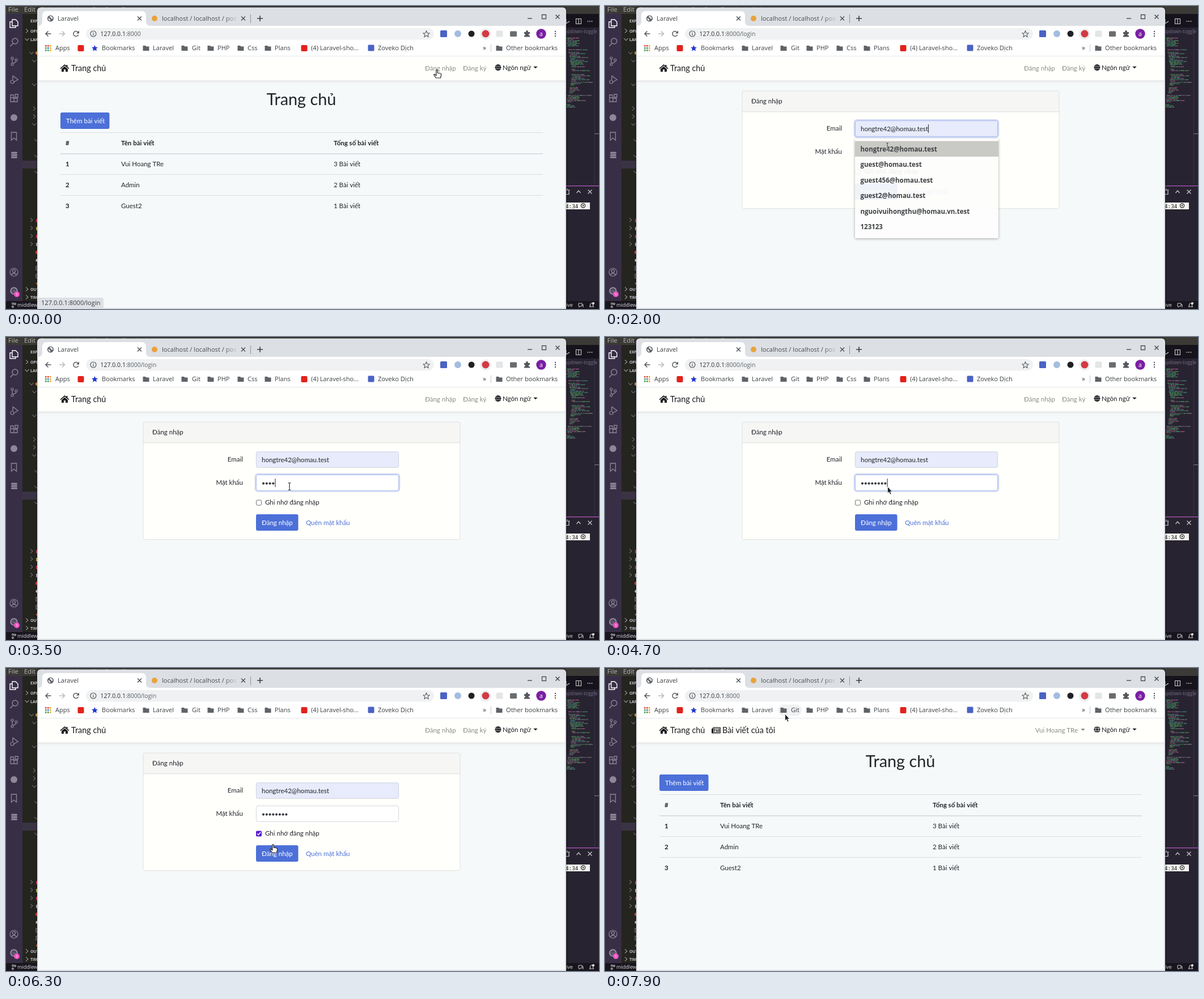
An HTML page with a canvas for the animation above (8 s loop, 1046x535 px).

```html
<!DOCTYPE html>
<html lang="vi">
<head>
<meta charset="utf-8">
<title>Trang chủ</title>
<style>
html, body { margin: 0; width: 100%; height: 100%; overflow: hidden; background: #282330; }
canvas { display: block; width: 1046px; height: 535px; }
</style>
</head>
<body>
<canvas id="stage" width="1046" height="535"></canvas>
<script>
const c = document.getElementById('stage').getContext('2d');
const UI = '"Open Sans", "Noto Sans", sans-serif';
const WEB = 'Lato, "Open Sans", sans-serif';
const MONO = '"DejaVu Sans Mono", monospace';
const LOOP = 8000, STEP = 100;
const EMAIL = 'hongtre42@homau.test', USER = 'Vui Hoang TRe', HOST = '127.0.0.1:8000';

function rect(x, y, w, h, fill, r = 0) {
  c.fillStyle = fill;
  c.beginPath();
  c.roundRect(x, y, w, h, r);
  c.fill();
}
function box(x, y, w, h, stroke, r = 0, lw = 1) {
  c.strokeStyle = stroke;
  c.lineWidth = lw;
  c.beginPath();
  c.roundRect(x, y, w, h, r);
  c.stroke();
}
function dot(x, y, r, fill) {
  c.fillStyle = fill;
  c.beginPath();
  c.arc(x, y, r, 0, 7);
  c.fill();
}
function ring(x, y, r, stroke, lw = 1.2, from = 0, to = 7) {
  c.strokeStyle = stroke;
  c.lineWidth = lw;
  c.beginPath();
  c.arc(x, y, r, from, to);
  c.stroke();
}
function path(d, x, y, { fill, stroke, lw = 1.3 }) {
  const p = new Path2D(d);
  c.save();
  c.translate(x, y);
  if (fill) { c.fillStyle = fill; c.fill(p); }
  if (stroke) { c.strokeStyle = stroke; c.lineWidth = lw; c.stroke(p); }
  c.restore();
}
const line = (d, x, y, stroke, lw) => path(d, x, y, { stroke, lw });
const shape = (d, x, y, fill) => path(d, x, y, { fill });
function text(s, x, y, { size = 11.1, font = UI, color = '#3c4043', weight = 400, align = 'left' } = {}) {
  c.font = `${weight} ${size}px ${font}`;
  c.fillStyle = color;
  c.textAlign = align;
  c.fillText(s, x, y);
  return c.measureText(s).width;
}
const web = (s, x, y, o) => text(s, x, y, { size: 11.5, font: WEB, color: '#212529', ...o });

function mulberry(seed) {
  return () => {
    seed = seed + 0x6D2B79F5 | 0;
    let v = Math.imul(seed ^ seed >>> 15, 1 | seed);
    v = v + Math.imul(v ^ v >>> 7, 61 | v) ^ v;
    return ((v ^ v >>> 14) >>> 0) / 4294967296;
  };
}

const CROSS = 'M-3.5-3.5L3.5 3.5M3.5-3.5L-3.5 3.5';
const RIGHT = 'M-2-3.5L2 0L-2 3.5', DOWN = 'M-3.5-2L0 2L3.5-2', UP = 'M-3.5 2L0-2L3.5 2';
const STAR = 'M0-5.5L1.6-1.8L5.5-1.5L2.6 1.1L3.5 5L0 2.9L-3.5 5L-2.6 1.1L-5.5-1.5L-1.6-1.8Z';
const FOLDER = 'M-5.5-4.5H-1L.5-3H5.5V4.5H-5.5Z';

function globe(x, y, r, fill, land) {
  dot(x, y, r, fill);
  line(`M${-r} -1.8H${r}M${-r} 1.8H${r}`, x, y, land, .7);
  c.beginPath();
  c.ellipse(x, y, r * .45, r, 0, 0, 7);
  c.stroke();
}

// ---- editor behind the browser ----
function editor() {
  const grey = '#8d8798', side = '#c9c6d0';
  rect(0, 0, 1046, 535, '#282330');
  rect(0, 0, 1046, 14, '#3b3a36');
  text('File', 4, 10, { size: 11.3, color: '#b9b7b0' });
  text('Edit', 32, 10, { size: 11.3, color: '#b9b7b0' });
  text('Selection   View   Go   Run   Terminal   Help', 61, 10, { size: 11.3, color: '#b9b7b0' });
  rect(0, 14, 29, 507, '#382f47');
  rect(29, 14, 27, 507, '#25251f');
  rect(29, 273, 27, 14, '#3a3344');
  rect(0, 521, 1046, 14, '#18151e');

  line('M-3-7H3L7-3V4H-3ZM-3-3H-7V7H3V4', 14, 31, '#fff', 1.4);
  ring(16, 62, 5, grey, 1.4);
  line('M12.5 66L7.5 71', 0, 0, grey, 1.6);
  ring(11, 92, 2, grey); ring(11, 103, 2, grey); ring(18, 95, 2, grey);
  line('M11 94V101M18 97Q18 100 12 101', 0, 0, grey);
  line('M-2-7L7 0L-1 5M-2-7V0', 14, 130, grey, 1.4);
  ring(11, 134, 3, grey);
  line('M-6-1H0V6H-6ZM0 6H6V0H0M-6-1V-6H-1V-1M2-7H7V-2H2Z', 14, 163, grey);
  dot(14, 197, 6, grey);
  line('M-4.5-7H4.5V7L0 3L-4.5 7Z', 14, 230, grey);
  for (let i = 0; i < 3; i++) rect(9, 257.5 + i * 4, 11, 3.2, grey, 1.5);
  ring(14, 470, 7, grey); ring(14, 468, 2.6, grey);
  line('M9 475Q14 469 19 475', 0, 0, grey);
  ring(14, 503, 5.5, grey, 2.6); ring(14, 503, 2, grey);
  dot(19, 509, 5, '#f255c5');
  text('1', 19, 511.5, { size: 7, color: '#fff', align: 'center' });

  const label = (s, x, y) => text(s, x, y, { size: 7, weight: 700, color: side });
  label('EXPLORER', 43, 29);
  [['OPEN', 44, RIGHT], ['LARAVEL', 59, DOWN], ['OUTLINE', 500, RIGHT], ['TIMELINE', 514, RIGHT]].forEach(([s, y, d]) => {
    line(d, 37, y, side, 1);
    label(s, 43, y + 3);
  });
  for (const y of [83, 97, 139, 209, 237, 265, 293]) line(DOWN, y < 90 ? 45 : y < 220 ? 50 : 54, y, grey, 1);
  for (const y of [181, 195]) line(RIGHT, 50, y, grey, 1);
  ['#d23b4e', '#c9b458', '#d23b4e', '#b3aebc'].forEach((k, i) => {
    line(RIGHT, 45, 378 + i * 14, grey, 1);
    rect(53, 376 + i * 14, 3, 6, k);
  });
  dot(55, 83, 3, '#d9963a');
  dot(55, 435, 3, '#e2493c');
  dot(55, 449, 2.5, '#ddd');
  [466, 480].forEach(y => text('[', 52, y, { size: 9, color: side }));
  dot(55, 490, 2, '#d9703a');
  ring(12, 525.5, 1.5, '#ddd', 1); ring(12, 531, 1.5, '#ddd', 1); ring(16, 526, 1.5, '#ddd', 1);
  text('middleware', 20, 531, { size: 9, color: '#ddd' });

  rect(988, 14, 58, 24, '#16131c');
  line('M-3-4V4M-3 4L3 0', 991, 27, '#ccc', 1.2);
  line('M-4.5-4.5H4.5V4.5H-4.5ZM0-4.5V4.5', 1010, 27, '#ccc', 1.1);
  for (let i = -1; i < 2; i++) dot(1030 + i * 3.5, 27, .9, '#ccc');
  text('dropdown-toggle', 1043, 48, { size: 8.3, color: '#77708a', align: 'right' });
  const rnd = mulberry(11), inks = ['#55d97a', '#6fc06e', '#d868a8', '#9a93a8', '#4fb8a0'];
  for (let i = 0; i < 54; i++) {
    const y = 56 + i * 2.3;
    let x = 988 + (1 - Math.cos(i / 8.5)) * 4.5 + rnd() * 3;
    const end = x + 6 + rnd() * rnd() * 42;
    if (rnd() < .12) continue;
    while (x < end && x < 1037) {
      const w = 2 + rnd() * 7;
      c.globalAlpha = .55 + rnd() * .3;
      rect(x, y, Math.min(w, 1038 - x), 1.2, inks[rnd() * inks.length | 0]);
      x += w + 1;
    }
  }
  c.globalAlpha = 1;
  rect(1038, 38, 1, 279, '#39334a');
  rect(1038, 225, 8, 1.2, '#77718a');
  rect(988, 317, 58, 1.2, '#b455c4');
  line('M-3-3H3V4.5H-3ZM-4.5-3H4.5M-1-5H1', 990, 328, '#ccc', 1.2);
  line(UP, 1010, 328, '#ccc', 1.2);
  line(CROSS, 1030, 328, '#ccc', 1.2);
  rect(988, 347, 42, 12, '#f1f1ee');
  text('4:34', 987, 356.5, { size: 9.3, font: MONO, color: '#222' });
  ring(1018, 352.5, 3.6, '#222', 1.2); dot(1018, 352.5, 1.2, '#222');
  text('ive', 988, 531, { size: 9, color: '#ddd' });
  line('M-4-3H2V2H-1L-3 4V2H-4ZM2-1H4V4', 1014, 528, '#ccc', 1);
  line('M-3.5 3H3.5L2.5 1V-1Q0-6-2.5-1V1Z', 1033, 528, '#ccc', 1.1);
  dot(1036, 525, 2, '#fff');
}

// ---- browser frame ----
function browser(s) {
  c.save();
  c.shadowColor = 'rgba(0,0,0,.5)';
  c.shadowBlur = 4;
  rect(55, 2.5, 933, 534, '#dcdfe3', [6, 6, 0, 0]);
  c.restore();
  rect(57, 35, 929, 498, '#fff');
  shape('M56 35Q64 35 64 28V17Q64 9 72 9H239Q247 9 247 17V28Q247 35 255 35Z', 0, 0, '#fff');
  if (s.loading) ring(78, 22, 5, '#4a80d8', 1.7, s.t / 150, s.t / 150 + 4);
  else {
    dot(78.5, 22, 5.6, '#5f6368');
    shape('M-4-1L-1 1L0 4Q-4 4-4-1ZM-1-4.2Q4-4 4 .5L1 1L2-1.5H-1Z', 78.5, 22, '#fff');
  }
  text('Laravel', 91, 26);
  line(CROSS, 235.5, 22, '#4a4d51', 1.4);
  dot(262, 22, 5, '#e9a23b');
  const fade = c.createLinearGradient(385, 0, 410, 0);
  fade.addColorStop(0, '#4a4d52');
  fade.addColorStop(1, 'rgba(74,77,82,0)');
  text('localhost / localhost / pos', 275, 26, { color: fade });
  line(CROSS, 418.5, 22, '#4a4d51', 1.4);
  rect(431, 15, 1, 15, '#8e9297');
  line('M-5 0H5M0-5V5', 448, 22, '#3c4043', 1.6);
  line('M-4 3H4', 924, 19, '#4a4d51', 1.4);
  box(945.5, 15.5, 7, 7, '#4a4d51', 0, 1.3);
  line(CROSS, 973, 19, '#4a4d51', 1.5);

  const icon = '#54585c';
  line('M5 0H-4.5M0-4.5L-4.5 0L0 4.5', 74.5, 49, icon, 1.5);
  line('M-5 0H4.5M0-4.5L4.5 0L0 4.5', 99, 49, '#b9bbbe', 1.5);
  ring(123.5, 49, 4.5, icon, 1.5, .4, 5.5);
  shape('M5.5-5.5V-.5H.5Z', 123.5, 49, icon);
  rect(141, 39, 614, 20.5, '#eff1f2', 10.3);
  ring(154, 49, 5, icon);
  line('M0-1V3M0-3V-1.8', 154, 49, icon, 1.2);
  const w = text(HOST.slice(0, 9), 166.5, 53, { size: 10.5, color: '#2b2e31' });
  text(HOST.slice(9) + (s.page === 'login' ? '/login' : ''), 166.5 + w, 53, { size: 10.5, color: '#5f6368' });
  line(STAR, 741.5, 49.5, icon, 1.1);
  rect(766, 43, 12, 12, '#4a63c4', 1.5);
  dot(797, 49, 6, '#a3bde0');
  dot(821, 49, 5.5, '#202124');
  dot(846, 49.5, 10, '#eceeef');
  dot(846, 49, 6.5, '#d23a44');
  rect(864.5, 43.5, 12, 11, '#e4e5e6', 1.5);
  rect(889, 44.5, 12, 9.5, '#6a6d70', 1.5);
  shape('M-5-3H-2Q-2-6 0-6Q2-6 2-3H5V0Q2.5 0 2.5 1.7Q2.5 3 5 3V5.5H-5V3Q-3 3-3 1.5Q-3 0-5 0Z', 919, 49, icon);
  dot(944, 49, 8.7, '#7a1fa2');
  text('a', 944, 52.5, { size: 10.5, color: '#fff', align: 'center' });
  for (let i = -1; i < 2; i++) dot(969, 49 + i * 4, 1.2, icon);

  if (s.git) rect(305, 64.5, 42, 20, '#f0f1f2', 10);
  const red = '#e0493c', yellow = '#e8b13a', green = '#46a15a';
  [red, red, yellow, green, '#4a80d8', yellow, green, green, yellow].forEach((k, i) =>
    rect(69 + i % 3 * 4, 69 + (i / 3 | 0) * 4, 2.7, 2.7, k));
  rect(126.5, 69, 11, 11, '#e3211c', 2);
  shape(STAR, 156.5, 74.5, '#2238cf');
  for (const x of [247, 315, 361, 414, 462, 870]) shape(FOLDER, x, 74.5, '#5f6368');
  rect(520.5, 69, 11, 11, '#e3211c', 2);
  rect(638.5, 68.5, 11, 11, '#4a63c4', 1.5);
  [['Apps', 87], ['Bookmarks', 169], ['Laravel', 259], ['Git', 328], ['PHP', 373], ['Css', 426], ['Plans', 474],
    ['(4) Laravel-sho…', 538], ['Zoveko Dịch', 656], ['Other bookmarks', 882]].forEach(([b, x]) => text(b, x, 78));
  text('»', 844, 78, { align: 'center', size: 12 });
  rect(855, 68, 1, 13, '#c5c8cc');
  rect(57, 88, 929, 1, '#e4e6e8');
}

// ---- web page ----
const PAPER = '#fffffc';

function nav(s) {
  rect(57, 89, 929, 444, '#f6f9fa');
  c.save();
  c.beginPath();
  c.rect(57, 89, 929, 60);
  c.clip();
  c.shadowColor = 'rgba(0,0,0,.1)';
  c.shadowBlur = 4;
  c.shadowOffsetY = 1.5;
  rect(50, 80, 950, 51.5, PAPER);
  c.restore();
  rect(57, 88, 929, 1, '#e4e6e8');

  const ink = '#1a1c1e';
  shape('M-8 0L0-7L3-4.4V-6H5V-2.6L8 0L7 1.2L0-4.8L-7 1.2ZM-5.5 1.2L0-3.4L5.5 1.2V6H1.5V2H-1.5V6H-5.5Z', 103.5, 110, ink);
  web('Trang chủ', 115, 115, { size: 14.4, color: ink });
  const soft = 'rgba(0,0,0,.46)';
  if (s.signed) {
    rect(190, 104.5, 14, 11, ink, 1.5);
    rect(188, 106.5, 3, 9, ink, 1.5);
    box(191.5, 106, 11, 8, PAPER, 0, .8);
    rect(193, 107.3, 8, 1.6, PAPER);
    rect(193, 110, 3.4, 2.8, PAPER);
    for (let i = 0; i < 2; i++) rect(197.5, 110 + i * 1.8, 3.5, 1, PAPER);
    web('Bài viết của tôi', 207, 115, { size: 14.4, color: ink });
    web(USER, 834, 113.5, { color: soft, align: 'right' });
    shape('M-3.7-1.8H3.7L0 1.8Z', 843, 109, 'rgba(0,0,0,.5)');
  } else {
    web('Đăng nhập', 739, 114, { color: s.hover ? 'rgba(0,0,0,.7)' : soft });
    web('Đăng ký', 806, 114, { color: soft });
  }
  globe(868, 108.5, 5.5, ink, PAPER);
  web('Ngôn ngữ', 876, 113, { color: ink });
  shape('M-3.7-1.8H3.7L0 1.8Z', 934, 108.5, ink);
}

const BLUE = '#4c70d8';
function button(label, x, y, w) {
  rect(x, y, w, 29, BLUE, 3);
  web(label, x + 10, y + 18.5, { color: '#fff' });
}

function home() {
  web('Trang chủ', 521, 175, { size: 28.8, align: 'center' });
  button('Thêm bài viết', 96, 188, 86.5);
  [[223, 1], [260, 2], [297, 1], [334, 1]].forEach(([y, h]) => rect(96, y, 851, h, '#dbdfe3'));
  [['#', 'Tên bài viết', 'Tổng số bài viết'], ['1', USER, '3 Bài viết'], ['2', 'Admin', '2 Bài viết'], ['3', 'Guest2', '1 Bài viết']]
    .forEach((row, i) => row.forEach((cell, j) =>
      web(cell, [105, 203, 578][j], i ? 246 + i * 37 : 245.5, { weight: i && j ? 400 : 700 })));
}

function field(y, focus, fill = '#fff') {
  if (focus) box(440, y - 1, 254, 30.5, `rgba(78,115,223,${.27 * focus})`, 4.5, 2.6);
  rect(441, y, 252, 28.5, fill, 3);
  box(441.4, y + .4, 251.2, 27.7, focus ? '#a3b4ea' : '#cdd2d8', 3, .9);
}
const caret = (x, y) => rect(x, y, 1, 15, '#222');

function login(s) {
  rect(242, 150, 559, 208, PAPER, 3);
  rect(242, 150, 559, 37, '#f6f6f5', [3, 3, 0, 0]);
  rect(242, 186.3, 559, .9, '#dcdddd');
  box(242, 150, 559, 207.7, '#dcdddd', 3, .9);
  web('Đăng nhập', 258, 172);
  web('Email', 418, 220, { align: 'right' });
  web('Mật khẩu', 418, 261, { align: 'right' });
  field(202.3, s.mailFocus, s.filled ? '#e7ebfb' : '#fff');
  const w = s.filled ? web(EMAIL, 451, 220.8) : 0;
  if (s.mailFocus === 1) caret(451 + w, 209);
  field(243, s.passFocus);
  for (let i = 0; i < s.dots; i++) dot(454 + i * 5.77, 258.6, 2.1, '#3a3e42');
  if (s.passFocus === 1) caret(451 + s.dots * 5.77 + (s.dots ? .4 : 0), 250);
  if (s.checked) {
    rect(441, 287.5, 10, 10, '#5a1fd0', 2);
    line('M-2.8 0L-.8 2.2L3-2.4', 446, 292.5, '#fff', 1.5);
  } else {
    rect(441, 287.5, 10, 10, '#fff', 2);
    box(441.5, 288, 9, 9, '#6f7276', 2, 1);
  }
  web('Ghi nhớ đăng nhập', 457, 296);
  button('Đăng nhập', 441, 313, 74.5);
  web('Quên mật khẩu', 529, 331.5, { color: BLUE });
  if (s.list) suggestions(s);
}

function suggestions(s) {
  // Shadow only outside the panel, so the fading panel stays light.
  c.save();
  const outside = new Path2D();
  outside.rect(430, 233, 275, 190);
  outside.rect(441, 234, 253, 176);
  c.clip(outside, 'evenodd');
  c.shadowColor = 'rgba(0,0,0,.35)';
  c.shadowBlur = 4;
  c.shadowOffsetY = 1;
  rect(441, 234, 253, 176, '#fff', 2);
  c.restore();
  c.globalAlpha = s.list;
  rect(441, 234, 253, 176, '#fdfdfc', 2);
  c.globalAlpha = 1;
  if (s.filled) rect(441, 238.5, 253, 27.5, '#c9cac6');
  [EMAIL, 'guest@homau.test', 'guest456@homau.test', 'guest2@homau.test', 'nguoivuihongthu@homau.vn.test', '123123']
    .forEach((item, i) => text(item, 450.5, 257 + i * 27.45, { weight: 700, size: 11.5, color: '#3e4043' }));
}

function bubble() {
  rect(57, 515, 115, 18, '#dde0e4', [0, 4, 0, 0]);
  text(HOST + '/login', 62, 528);
}

// ---- pointer: time, x, y of the hot spot ----
const MOVES = [
  [0, 760, 113], [500, 760, 113], [700, 690, 137], [900, 520, 182], [1000, 440, 205], [1100, 403, 214],
  [1200, 425, 216], [1300, 462, 219], [1500, 490, 222], [1900, 498, 247], [2000, 498, 248], [2200, 498, 249],
  [2500, 500, 264], [4600, 500, 264], [4700, 498, 264], [4900, 620, 310], [5000, 682, 332], [5100, 540, 316],
  [5200, 427, 300], [5600, 427, 300], [5800, 445, 291], [6000, 446, 292], [6200, 470, 311], [6300, 471, 312],
  [6600, 471, 312], [6900, 525, 290], [7200, 598, 250], [7400, 598, 250], [7700, 400, 130], [7900, 317, 81]
];
function pointerAt(t) {
  const i = MOVES.findIndex(m => m[0] > t);
  if (i < 0) return MOVES[MOVES.length - 1].slice(1);
  const [t0, x0, y0] = MOVES[i - 1], [t1, x1, y1] = MOVES[i], k = (t - t0) / (t1 - t0);
  return [x0 + (x1 - x0) * k, y0 + (y1 - y0) * k];
}
const HAND = 'M-1.2 0Q0-1 1.2 0V5L6.5 6Q8 6.5 7.6 9L6.5 14H-1.5L-5 9Q-5.5 7.5-4 7.4L-1.2 9.5Z';
const BEAM = 'M-2.5-6.5Q0-6.5 0-5Q0-6.5 2.5-6.5M0-5V5M-2.5 6.5Q0 6.5 0 5Q0 6.5 2.5 6.5';
const ARROW = 'M.5.3V12L3 9.6L5 14L7 13.1L5.1 8.9H8.6Z';
function pointer(t) {
  const [x, y] = pointerAt(t);
  const within = (a, b) => t >= a && t < b;
  if (within(0, 700) || within(6200, 6900)) path(HAND, x, y, { fill: '#fff', stroke: '#222', lw: 1.2 });
  else if (within(1300, 4700)) {
    line(BEAM, x, y, '#fff', 2.4);
    line(BEAM, x, y, '#222', 1.1);
  } else path(ARROW, x, y, { fill: '#1d1d1f', stroke: '#fff', lw: .7 });
}

const TYPED = [3200, 3300, 3300, 3500, 3800, 4000, 4300, 4500];
const ramp = (t, a, b) => Math.min(1, Math.max(0, (t - a) / (b - a)));
function stateAt(t) {
  return {
    t,
    page: t >= 700 && t < 6900 ? 'login' : 'home',
    signed: t >= 6900,
    hover: t >= 100 && t < 700,
    loading: t >= 500 && t < 900 || t >= 6500 && t < 7100,
    status: t < 900,
    mailFocus: 1 - ramp(t, 2200, 2500),
    passFocus: ramp(t, 2700, 2900) * (t < 5800),
    filled: t >= 1800,
    list: t >= 1500 && t < 2100 ? (t < 2000 ? 1 : .93) : 0,
    dots: TYPED.filter(k => t >= k).length,
    checked: t >= 5900,
    git: t >= 7900
  };
}

function draw(t) {
  const s = stateAt(t);
  editor();
  browser(s);
  nav(s);
  if (s.page === 'login') login(s); else home();
  if (s.status) bubble();
  pointer(t);
}

const start = performance.now();
let shown = -1;
function tick() {
  const t = Math.floor((performance.now() - start) % LOOP / STEP) * STEP;
  if (t !== shown) draw(shown = t);
  requestAnimationFrame(tick);
}
draw(0);
tick();
</script>
</body>
</html>
```
